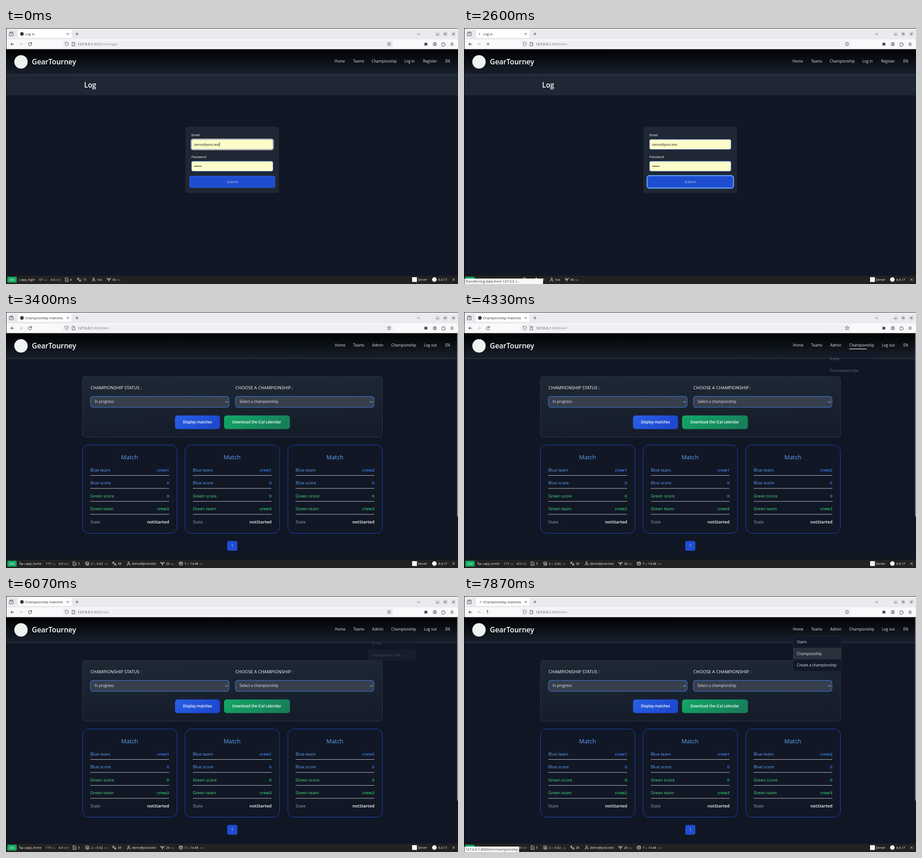
Animation of 995x563 px, one loop 8000 ms. Source, as an HTML page:

```html
<!DOCTYPE html>
<html lang="en">
<head>
<meta charset="utf-8">
<title>League dashboard</title>
<style>
  html, body { margin: 0; width: 100%; height: 100%; overflow: hidden; background: #111827; }
  svg { display: block; width: 995px; height: 563px; font-family: "Open Sans", "Noto Sans", sans-serif; }
  text { white-space: pre; }
</style>
</head>
<body>
<svg id="stage" viewBox="0 0 995 563"></svg>
<script>
const LOOP = 8000;
const BRAND = 'GearTourney', EMAIL = 'demo@post.test', HOST = '127.0.0.1';
const INK = '#4a4a55', BLUE = '#60a5fa', GREEN = '#4ade80', PALE = '#e5e7eb';

// y is the middle of the capitals
const text = (x, y, str, size, fill, attrs = '') =>
  `<text x="${x}" y="${y + size * 0.355}" font-size="${size}" fill="${fill}" ${attrs}>${str}</text>`;
const rect = (x, y, w, h, fill, r = 0, attrs = '') =>
  `<rect x="${x}" y="${y}" width="${w}" height="${h}" rx="${r}" fill="${fill}" ${attrs}/>`;
const circle = (x, y, r, fill, attrs = '') =>
  `<circle cx="${x}" cy="${y}" r="${r}" fill="${fill}" ${attrs}/>`;
const line = (d, color = INK, width = 1, attrs = '') =>
  `<path d="${d}" fill="none" stroke="${color}" stroke-width="${width}" stroke-linecap="round" stroke-linejoin="round" ${attrs}/>`;
const group = (id, body) => `<g id="${id}">${body}</g>`;
const stroke = (color, width = 1) => `stroke="${color}" stroke-width="${width}"`;
const cross = (x, y, r, color, width) => line(`M${x - r} ${y - r}l${2 * r} ${2 * r}m0 ${-2 * r}l${-2 * r} ${2 * r}`, color, width);
const MEDIUM = 'font-weight="500"', BOLD = 'font-weight="600"', MIDDLE = 'text-anchor="middle"', END = 'text-anchor="end"';

const gradient = (id, from, to, x2, y2) =>
  `<linearGradient id="${id}" x2="${x2}" y2="${y2}"><stop stop-color="${from}"/><stop offset="1" stop-color="${to}"/></linearGradient>`;

function browser() {
  const windowButtons = [950, 967, 985].map(x => circle(x, 13, 5.5, '#dad9de')).join('');
  return rect(0, 0, 995, 25, '#ebeaee') + rect(0, 25, 995, 21.5, '#f9f9fb') +
    rect(25.5, 3, 119.5, 19.5, '#fff', 2, stroke('#d5d4da', 0.7)) +
    line('M8 10.5h8v6.5h-8zM9 8.7h6M10.5 13h3', INK) + line('M20.5 5v16', '#d0cfd6', 0.6) +
    cross(136, 13, 2, INK, 0.9) + line('M153 13h6.4M156.2 9.8v6.4', INK) +
    line('M905.5 12l2.7 2.5 2.7-2.5', INK) + windowButtons +
    line('M948 14.5h4', INK) + line('M965.5 11.5h3v3h-3z', INK, 0.8) + cross(985, 13, 1.8, INK, 1) +
    line('M17 35.5h-6.5m3-3l-3 3 3 3', '#222') + line('M30 35.5h6.5m-3-3l3 3-3 3', '#b9b9c0') +
    rect(125, 27.5, 727, 16, '#f0f0f4', 2) +
    line('M133.5 31.2l3.4 1.2c0 3.5-1 5.8-3.4 7.3-2.4-1.5-3.4-3.8-3.4-7.3z', INK, 0.9) +
    line('M146 31.5h3.2l2.2 2.2v5.8h-5.4zM149 31.7v2.3h2.3', INK, 0.9) +
    line('M843.3 31l1.2 2.7 3 .3-2.2 2 .6 3-2.6-1.5-2.6 1.5.6-3-2.2-2 3-.3z', INK, 0.9) +
    rect(921, 32.5, 6.5, 6, INK, 1) +
    circle(944, 35.5, 3.8, 'none', stroke(INK)) + circle(944, 34.4, 1.4, INK) + line('M941.8 37.6q2.2-1.7 4.4 0', INK) +
    line('M960 33.5h2v-1.6h2v1.6h2v2h1v2h-1v2h-6zM', INK, 0.9).replace('zM', 'z') +
    line('M979.2 33h5.6m-5.6 2.5h5.6m-5.6 2.5h5.6', INK) +
    group('favicon', circle(35, 13, 4, '#3a3a3a')) +
    group('spinner', circle(0, 13, 1.2, '#5b5b66')) +
    text(42, 13, '', 7.6, '#2b2a33', 'id="title"') +
    group('reload', line('M55.8 33.6a3.5 3.5 0 1 0 .6 2.9M56.3 31.6v2.5h-2.5', '#222')) +
    group('stop', cross(52.8, 35.5, 2.7, '#222', 1)) +
    group('morph', line('M50.5 32.2q1.4 3 2.2 6.2M50.5 32.2l2.3 .3', '#222')) +
    text(158, 35.3, `<tspan fill="#35343e">${HOST}</tspan>:8000/en/<tspan id="path">login</tspan>`, 8, '#85858f');
}

const header = items =>
  rect(0, 46.5, 995, 56, 'url(#head)') + rect(0, 102, 995, 0.9, '#3b4453') +
  circle(33, 74.5, 14.7, '#f1f2f2') + text(57, 74.5, BRAND, 15.7, '#fff', BOLD) +
  items.map(([x, label]) => text(x, 73.5, label, 8.15, PALE)).join('');

const field = (y, body) =>
  rect(408.3, y, 179.5, 22, '#fcfdc9', 3.5, stroke('#4670db', 0.9)) + body;

function loginPage() {
  const dots = [0, 1, 2, 3, 4, 5].map(i => circle(415.4 + i * 2.75, 304, 1.05, '#111')).join('');
  return rect(0, 46, 995, 498, '#111725') +
    header([[723, 'Home'], [764, 'Teams'], [805, 'Championship'], [877, 'Log in'], [918, 'Register'], [967, 'EN']]) +
    rect(0, 103, 995, 45, '#1f2734') + text(172, 125.5, 'Log', 15.5, '#fff', BOLD) +
    rect(395, 217, 206, 146, '#1f2734', 5) +
    text(408, 235, 'Email', 7.3, '#fff', MEDIUM) + text(408, 283, 'Password', 7.3, '#fff', MEDIUM) +
    group('emailFocus', rect(407, 243.7, 182, 24.6, '#fff', 4.5, stroke('#d09a6a', 0.9))) +
    field(245, text(414, 256, EMAIL, 7.25, '#15151c')) +
    group('caret', rect(469.6, 251, 0.8, 9.5, '#111')) +
    field(293, dots) +
    rect(404, 325.7, 188, 25.3, '#1f4dd1', 4, stroke('#3566dc', 0.9)) +
    group('submitFocus', rect(403, 324.7, 190.2, 27.4, 'none', 5, stroke('#60a5f6', 2.2))) +
    text(498, 338.3, 'Submit', 7.4, '#c4d0ec', MIDDLE);
}

const select = (x, label) =>
  rect(x + 0.5, 185.5, 305, 24.3, '#373f4c', 6, stroke('#3b7ff0', 1.1)) + text(x + 9.5, 197.5, label, 8.2, PALE) +
  line(`M${x + 298} 197l2 2 2-2`, '#fff', 1);

function matchCard(x, blue, green) {
  const rows = [
    ['Blue team', blue, BLUE, '#3b82f6'], ['Blue score', 0, BLUE, '#3b82f6'],
    ['Green score', 0, GREEN, '#2fc06c'], ['Green team', green, GREEN, '#2fc06c'],
    ['State', 'notStarted', '#9ca3af', '#fff']];
  return rect(x + 0.5, 292.5, 208, 194, '#111725', 13, stroke('#1c48c4')) +
    text(x + 104, 319, 'Match', 12.9, BLUE, `${MEDIUM} ${MIDDLE}`) +
    rows.map(([label, value, tone, strong], i) => {
      const y = 347.3 + i * 28.5;
      return text(x + 17.5, y, label, 9.35, tone, MEDIUM) + text(x + 191, y, value, 9.4, strong, `${BOLD} ${END}`) +
        (i < 4 ? rect(x + 17.5, y + 11.7, 173.5, 0.9, '#cfd2d8') : '');
    }).join('');
}

const menu = (id, x, labels) => group(id,
  rect(x + 0.5, 88, 106, labels.length * 25.8, '#111827', 2, stroke('#232b39', 0.9)) +
  group(id + 'Hover', rect(x + 0.5, 88, 106, 25.6, '#2a313d')) +
  labels.map((label, i) => text(x + 8.8, 101 + i * 25.8, label, 8.15, PALE)).join(''));

function homePage() {
  return rect(0, 46, 995, 517, '#101624') +
    header([[724, 'Home'], [764.5, 'Teams'], [806, 'Admin'], [848, 'Championship'], [920, 'Log out'], [967, 'EN']]) +
    rect(168.5, 142, 660, 133, 'url(#panel)', 6, stroke('#303947')) +
    text(186, 167, 'CHAMPIONSHIP STATUS :', 9.65, '#fff', MEDIUM) + text(505, 167, 'CHOOSE A CHAMPIONSHIP :', 9.65, '#fff', MEDIUM) +
    select(185.5, 'In progress') + select(504.5, 'Select a championship') +
    rect(372, 227.5, 99, 30, 'url(#blue)', 6) + text(421.5, 242.5, 'Display matches', 8.1, '#fff', `${BOLD} ${MIDDLE}`) +
    rect(480, 227.5, 145, 30, 'url(#green)', 6) + text(552, 242.5, 'Download the iCal calendar', 8.15, '#fff', `${BOLD} ${MIDDLE}`) +
    matchCard(168, 'crew1', 'crew2') + matchCard(393.7, 'crew1', 'crew3') + matchCard(620, 'crew2', 'crew3') +
    rect(487, 503.5, 22.3, 21.5, '#1f4dd1', 4) + text(498.2, 514.5, '1', 8.2, '#cbd6f2', MIDDLE) +
    group('scrollbar', rect(993, 47, 2, 403, '#8b8e98', 1)) +
    rect(848, 80.7, 1, 1.2, '#fff', 0, 'id="champLine"') + rect(806, 80.7, 1, 1.2, '#fff', 0, 'id="adminLine"') +
    menu('champMenu', 796, ['Score', 'Tournament tree']) +
    menu('adminMenu', 724, ['Users', 'Championship', 'Create a championship']);
}

const icons = {
  page: 'M-3-4h4l2.2 2.2v5.8h-6.2zM0-1v2.6',
  lang: 'M-4-2.6h4M-2-4v1.4q0 2.4-2 3.2M-3.4-1.6q1 2 3 2.2M0 4l2-5 2 5M.8 2.4h2.4',
  user: 'M0-4a2 2 0 1 0 .01 0zM-3 4.2v-1.2q0-2 2-2h2q2 0 2 2v1.2',
  plant: 'M0 4v-4q0-3 4-3 0 3-4 3M0 1q-4 0-4-4 4 0 4 4',
  stack: 'M0-4l4 2-4 2-4-2zM-4 .2l4 2 4-2M-4 2.2l4 2 4-2',
  data: 'M-3.5-2.7q3.5-2.6 7 0v5.4q-3.5 2.6-7 0zM-3.5-2.7q3.5 2.4 7 0M-3.5 0q3.5 2.4 7 0',
  turn: 'M-3-3.5v4.5h6.5m-2.5-2.5l2.5 2.5-2.5 2.5'
};
const icon = (name, x) => line(icons[name], '#f0f0f0', 0.9, `transform="translate(${x} 553.3)"`);
const info = (x, str) => text(x, 553.5, str.replace(/\[(.*?)\]/g, '<tspan font-size="5.7" fill="#999">$1</tspan>'), 6.9, '#f0f0f0');
const toolbar = items =>
  rect(0, 543.5, 995, 20, '#222') + rect(0, 543.5, 995, 0.8, '#0b0b0b') +
  rect(3, 547, 20.5, 13, '#10a65f', 2) + text(13.2, 553.5, '200', 6.9, '#fff', MIDDLE) +
  items.map(([x, value]) => icons[value] ? icon(value, x) : info(x, value)).join('') +
  rect(894, 548, 10.5, 10.5, '#fff') + info(906.5, 'Server') + circle(943, 553.3, 5, '#fff') + info(951.5, '6.4.17') +
  cross(985.3, 553.3, 2.4, '#ddd', 1);

const loginTools = [[28, '[@]app_login'], [73, '67 [ms]'], [98.5, '4.0 [MiB]'], ['134', 'page'], [141, '4'], [161, 'lang'],
  [169, '15'], [193, 'user'], [200.5, 'n/a'], [226.5, 'plant'], [234, '40 [ms]']];
const homeTools = [[33.5, 'turn'], [39, '[@]app_home'], [87, '117 [ms]'], [116, '4.0 [MiB]'], [151, 'page'], [158.5, '5'],
  [179, 'stack'], [187, '2 [in] 0.02 [ ms]'], [238.5, 'lang'], [246, '38'], [270, 'user'], [277, EMAIL],
  [344.5, 'plant'], [352, '26 [ms]'], [385, 'data'], [393, '7 [in] 14.48 [ ms]']];

const stage = document.getElementById('stage');
stage.innerHTML = '<defs>' + gradient('head', '#000', '#18202d', 0.04, 1) + gradient('panel', '#1f2835', '#151d2a', 0.15, 1) +
  gradient('blue', '#2860e6', '#1d48cf', 1, 0.3) + gradient('green', '#12a866', '#17805a', 1, 0.3) + '</defs>' +
  group('login', loginPage() + toolbar(loginTools)) + group('home', homePage()) + group('homeTools', toolbar(homeTools)) +
  browser() + group('status', rect(0, 551, 174, 13, '#f9f9fb', 1, 'id="statusBox"') + text(3, 557.3, '', 7.6, '#35343e', 'id="statusText"')) +
  rect(0, 0, 995, 0.9, '#111') + rect(0, 0, 0.9, 563, '#0b0b0e');

const el = Object.fromEntries([...stage.querySelectorAll('[id]')].map(node => [node.id, node]));
const show = (id, on) => el[id].setAttribute('visibility', on ? 'inherit' : 'hidden');
const label = (id, str) => { if (el[id].textContent !== str) el[id].textContent = str; };
const ease = x => { x = Math.min(1, Math.max(0, x)); return x * x * (3 - 2 * x); };
const pulse = (t, start, end, time) => ease((t - start) / time) * (1 - ease((t - end) / time));

function setMenu(id, shown, hoverRow) {
  el[id].setAttribute('opacity', shown);
  el[id].setAttribute('transform', `translate(0 ${4 * (1 - shown)})`);
  show(id + 'Hover', hoverRow >= 0);
  el[id + 'Hover'].setAttribute('transform', `translate(0 ${25.8 * Math.max(0, hoverRow)})`);
}

// [start, text, panel width], where 0 means fit the text
const statuses = [[0, ''], [530, `Waiting for ${HOST}…`, 174], [800, HOST, 174], [2400, `Transferring data from ${HOST}…`, 174],
  [3400, ''], [4930, `${HOST}:8000/en/score/table/`, 0], [5600, `${HOST}:8000/en/tournament`, 0], [5930, ''],
  [7270, `${HOST}:8000/en/users`, 0], [7530, `${HOST}:8000/en/championship`, 0]];
let shownStatus;

function setStatus(t) {
  const current = statuses.findLast(s => t >= s[0]);
  if (current === shownStatus) return;
  shownStatus = current;
  label('statusText', current[1]);
  show('status', current[1] !== '');
  el.statusBox.setAttribute('width', current[2] || el.statusText.getComputedTextLength() + 5);
}

function render(t) {
  const loaded = t >= 2870, loading = t >= 530 && t < 3400 || t >= 7800, submitted = t >= 470;
  show('login', !loaded);
  show('home', loaded);
  show('homeTools', t >= 3070);
  show('scrollbar', t >= 3070);
  show('emailFocus', !submitted);
  show('caret', t < 70);
  show('submitFocus', submitted);

  show('favicon', !loading);
  show('spinner', loading);
  show('reload', !loading);
  show('stop', loading && t < 3400);
  show('morph', t >= 7800);
  el.spinner.setAttribute('transform', `translate(${35.5 - 4.3 * Math.cos((t - 1530) / 1340 * 2 * Math.PI)} 0)`);
  label('title', t < 2670 ? 'Log in' : 'Championship matches');
  label('path', t < 2400 ? 'login' : '');

  el.champLine.setAttribute('width', 38 * pulse(t, 4170, 4670, 150));
  el.adminLine.setAttribute('width', 16.5 * pulse(t, 6400, 7200, 150));
  setMenu('champMenu', pulse(t, 4200, 5870, 300), t < 4930 ? -1 : t < 5600 ? 0 : 1);
  setMenu('adminMenu', pulse(t, 6430, LOOP, 300), t < 7270 ? -1 : t < 7530 ? 0 : 1);
  setStatus(t);
}

function tick(now) {
  render(now % LOOP);
  requestAnimationFrame(tick);
}
requestAnimationFrame(tick);
</script>
</body>
</html>
```
